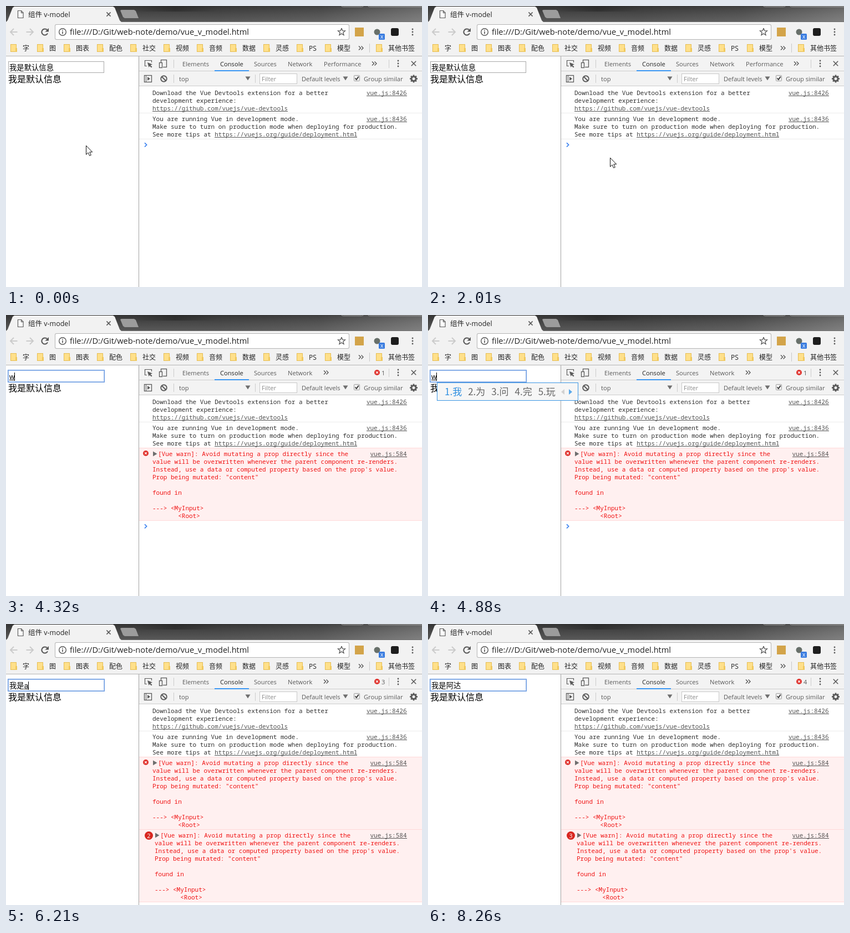
An HTML page with a canvas for the animation above (8.34 s loop, 750 by 508 pixels).

```html
<!DOCTYPE html>
<html lang="zh-CN">
<head>
<meta charset="utf-8">
<title>组件 v-model</title>
<style>
html, body { margin: 0; width: 100%; height: 100%; overflow: hidden; background: #fff; }
canvas { display: block; width: 750px; height: 508px; }
</style>
</head>
<body>
<canvas id="stage" width="750" height="508"></canvas>
<script>
const g = document.getElementById('stage').getContext('2d');
const LOOP = 8340;
const CJK = '"Noto Sans CJK SC", "Noto Sans CJK", "Noto Sans CJK JP", sans-serif';
const UI = '"Open Sans", ' + CJK;
const MONO = '11px "Noto Sans Mono", monospace';
const FIELD = '13.33px "Liberation Sans", ' + CJK;
const BIG = '16px "Liberation Sans", ' + CJK;
const IME = '300 17px ' + CJK;
const RED = '#f01414';
const MSG = '我是默认信息';

// Each entry changes part of the state from its time on.
const steps = [
  [0, { mx: 144, my: 252, pointer: 'arrow', text: MSG, compose: '', errors: 0, log: true }],
  [80, { mx: 145, my: 253 }],
  [640, { loading: true, spin: 0 }],
  [720, { spin: 1, log: false }],
  [800, { spin: 2 }],
  [870, { spin: 3 }],
  [1050, { spin: 5, log: true }],
  [1130, { spin: 6 }],
  [1340, { loading: false }],
  [1800, { mx: 212, my: 262 }],
  [1900, { mx: 290, my: 271 }],
  [2010, { mx: 328, my: 274 }],
  [2180, { mx: 255, my: 226 }],
  [2260, { mx: 172, my: 164 }],
  [2340, { mx: 133, my: 144 }],
  [2480, { mx: 139, my: 160 }],
  [2570, { mx: 142, my: 167 }],
  [2660, { mx: 140, my: 152 }],
  [2750, { mx: 136, my: 134 }],
  [2840, { pointer: 'beam', mx: 132, my: 119 }],
  [2930, { mx: 129, my: 117 }],
  [3020, { focus: true, caret: true }],
  [3400, { mx: 133, my: 115 }],
  [3570, { my: 117, caret: false, select: 4 }],
  [3690, { select: 0 }],
  [4320, { text: '', compose: 'w', select: -1, pointer: '', caret: true, errors: 1 }],
  [4420, { words: '我 为 问 完 玩', caret: false }],
  [4880, { caret: true }],
  [4980, { words: '' }],
  [5080, { text: '我', compose: '', errors: 2 }],
  [5260, { compose: 's' }],
  [5350, { compose: 'sh' }],
  [5450, { compose: 'shi', words: '是 时 事 十 使' }],
  [5550, { words: '' }],
  [5640, { text: '我是', compose: '', errors: 3 }],
  [6210, { compose: 'a' }],
  [6300, { compose: 'ad', words: '阿达 阿德 阿斗 爱的 啊' }],
  [6490, { compose: 'ada', words: '' }],
  [6570, { text: '我是阿达', compose: '', errors: 4 }],
  [7130, { caret: false }],
  [7590, { caret: true }],
  [8260, { caret: false }]
];

function stateAt(t) {
  const s = { select: -1, words: '' };
  for (const [at, change] of steps) if (at <= t) Object.assign(s, change);
  return s;
}

function box(x, y, w, h, fill) { g.fillStyle = fill; g.fillRect(x, y, w, h); }

function frame(x, y, w, h, color, width = 1) {
  g.strokeStyle = color;
  g.lineWidth = width;
  g.strokeRect(x + .5, y + .5, w - 1, h - 1);
}

function poly(points, fill) {
  g.beginPath();
  points.forEach(([x, y]) => g.lineTo(x, y));
  g.closePath();
  g.fillStyle = fill;
  g.fill();
}

function line(points, color, width = 1) {
  g.beginPath();
  points.forEach(([x, y], i) => i ? g.lineTo(x, y) : g.moveTo(x, y));
  g.strokeStyle = color;
  g.lineWidth = width;
  g.stroke();
}

function fade(x0, y0, x1, y1, colors) {
  const grad = g.createLinearGradient(x0, y0, x1, y1);
  colors.forEach((c, i) => grad.addColorStop(i / (colors.length - 1), c));
  return grad;
}

function disc(x, y, r, fill) {
  g.beginPath();
  g.arc(x, y, r, 0, 7);
  g.fillStyle = fill;
  g.fill();
}

function ring(x, y, r, color, width, a = 0, b = Math.PI * 2) {
  g.beginPath();
  g.arc(x, y, r, a, b);
  g.strokeStyle = color;
  g.lineWidth = width;
  g.stroke();
}

function pill(x, y, w, h, r, fill) {
  g.beginPath();
  g.roundRect(x, y, w, h, r);
  g.fillStyle = fill;
  g.fill();
}

function label(str, x, y, font, color, align = 'left') {
  g.font = font;
  g.textAlign = align;
  g.fillStyle = color;
  g.fillText(str, x, y);
}

function cross(x, y, r, color, width) {
  line([[x - r, y - r], [x + r, y + r]], color, width);
  line([[x - r, y + r], [x + r, y - r]], color, width);
}

function chevron(x, y, r, color, width) {
  line([[x, y - r], [x + r, y], [x, y + r]], color, width);
}

function more(x, y) { chevron(x, y, 3.5, '#555', 1.4); chevron(x + 4.5, y, 3.5, '#555', 1.4); }

function dots(x, y) { for (const d of [-5, 0, 5]) disc(x, y + d, 1.4, '#5a5a5a'); }

function errorIcon(x, y) { disc(x, y, 5, '#e0342f'); cross(x, y, 1.9, '#fff', 1.2); }

function down(x, y) { poly([[x - 4.5, y - 3.5], [x + 4.5, y - 3.5], [x, y + 3.5]], '#6e6e6e'); }

function link(str, x, y, align) {
  label(str, x, y, MONO, '#545454', align);
  const w = g.measureText(str).width;
  box(Math.round(align === 'right' ? x - w : x), y + 1, Math.round(w), 1, '#545454');
}

function titleBar(s) {
  box(0, 0, 750, 28, fade(0, 0, 0, 28, ['#343434', '#484848', '#585858']));
  box(230, 0, 150, 10, fade(230, 0, 380, 0, ['rgba(30,30,30,0)', 'rgba(30,30,30,.45)', 'rgba(30,30,30,0)']));
  box(380, 0, 370, 28, fade(380, 0, 750, 28, ['rgba(255,255,255,0)', 'rgba(255,255,255,.06)', 'rgba(255,255,255,.24)']));
  g.strokeStyle = '#a4a4a4';
  g.lineWidth = 1;
  for (const [x, w] of [[604.5, 40], [652.5, 110]]) {
    g.beginPath();
    g.roundRect(x, -6, w, 7.5, 3);
    g.stroke();
  }
  box(0, 28, 750, 1, '#6c6c6c');
  poly([[0, 29], [3, 26], [12, 3], [15, 1], [193, 1], [196, 3], [205, 26], [208, 29]], '#f2f2f2');
  poly([[206, 8], [208, 7], [231, 7], [234, 9], [239, 22], [214, 22], [211, 20]], '#9c9c9c');
  if (s.loading) {
    const a = s.spin * .9 - 4.6;
    ring(25.5, 15, 6, '#4a84e4', 2, a, a + 4.4);
  } else {
    const sheet = [[21.5, 8.5], [27.5, 8.5], [31, 12], [31, 21.5], [21.5, 21.5], [21.5, 8]];
    poly(sheet, '#fff');
    line(sheet, '#5a5a5a', 1.2);
    line([[27.5, 8.5], [27.5, 12.5], [31, 12.5]], '#5a5a5a', 1.2);
  }
  label('组件 v-model', 40, 19.5, '12.5px ' + UI, '#222');
  cross(185, 15, 3.6, '#5a5a5a', 1.5);
}

function arrowIcon(x, dir) {
  const color = '#cbcbcb';
  line([[x - 6.5 * dir, 47], [x + 5 * dir, 47]], color, 2);
  line([[x, 41], [x + 6 * dir, 47], [x, 53]], color, 2);
}

function star(x, y) {
  const pts = [];
  for (let i = 0; i <= 10; i++) {
    const r = i % 2 ? 3 : 6.8, a = i * Math.PI / 5 - Math.PI / 2;
    pts.push([x + r * Math.cos(a), y + r * Math.sin(a)]);
  }
  line(pts, '#555', 1.3);
}

function toolbar(s) {
  box(0, 29, 750, 61, '#f2f2f2');
  box(0, 90, 750, 1, '#b5b5b5');
  arrowIcon(14, -1);
  arrowIcon(43, 1);
  if (s.loading) cross(70, 47, 5.2, '#555', 2);
  else {
    ring(70, 47, 5.6, '#555', 2, .45, 5.5);
    poly([[77, 40], [77, 46.5], [70.5, 46.5]], '#555');
  }
  pill(88, 33, 531, 28, 3, '#b3b3b3');
  pill(89, 34, 529, 26, 2, '#fff');
  ring(102, 47, 6.3, '#555', 1.4);
  box(101.2, 46, 1.6, 4.5, '#555');
  box(101.2, 43.2, 1.6, 1.6, '#555');
  label('file:///D:/Git/web-note/demo/vue_v_model.html', 115, 52, '14.6px ' + UI, '#222');
  star(605, 47);
  box(629, 39, 16, 16, '#d3a44a');
  disc(669, 47, 5.5, '#68706a');
  if (!s.loading) {
    pill(672, 50, 11, 11, 1.5, '#3b7de0');
    label('x', 677.5, 59, '10px ' + UI, '#fff', 'center');
  }
  pill(694, 40, 14, 14, 3, s.loading ? '#929292' : '#1d1d1d');
  dots(733, 47);
}

function folder(x) {
  box(x, 69, 11, 14, '#e6bd53');
  box(x + 1, 70, 9, 12, '#ffe08a');
  box(x + 9, 76, 3, 7, '#f0c95f');
}

function bookmarks() {
  const font = '12px ' + UI;
  const marks = { 字: 8, 图: 56, 图表: 104, 配色: 164, 社交: 224, 视频: 284, 音频: 344, 数据: 404, 灵感: 464, PS: 524, 模型: 575 };
  for (const [name, x] of Object.entries(marks)) {
    folder(x);
    label(name, x + 22, 80.5, font, '#222');
  }
  more(636, 76);
  box(655, 68, 1, 16, '#c8c8c8');
  folder(667);
  label('其他书签', 689, 80.5, font, '#222');
}

function page(s) {
  box(0, 91, 239, 417, '#fff');
  frame(4, 100, 173, 21, '#a9a9a9');
  if (s.focus) {
    frame(3, 99, 175, 23, '#6597e0');
    frame(4, 100, 173, 21, '#a3c1ee');
  }
  label(MSG, 4, 138, BIG, '#000');
  g.font = FIELD;
  const width = str => g.measureText(str).width;
  const start = 6 + width(s.text), end = start + width(s.compose);
  label(s.text + s.compose, 6, 115.5, FIELD, '#000');
  if (s.compose) box(start, 117, end - start, 1, '#000');
  if (s.select >= 0) {
    const head = s.text.slice(0, s.select), tail = s.text.slice(s.select);
    const x = 6 + width(head);
    box(x, 104, width(tail), 16, '#3390ff');
    label(tail, x, 115.5, FIELD, '#fff');
  }
  if (s.caret) box(Math.floor(end), 104, 1, 15, '#000');
}

function devTools(s) {
  box(239, 91, 1, 417, '#a3a3a3');
  box(240, 91, 510, 54, '#f3f3f3');
  box(240, 117, 510, 1, '#ccc');
  box(240, 144, 510, 1, '#ccc');
  const font = '11.15px ' + UI, gray = '#5a5a5a';

  line([[254, 108.5], [250.5, 108.5], [250.5, 98.5], [262.5, 98.5], [262.5, 102]], gray, 1.2);
  poly([[255, 102], [264, 105.5], [260.5, 107], [263.5, 110], [262, 111.5], [259, 108.5], [257.5, 111]], gray);
  frame(279, 97, 11, 14, gray, 1.3);
  box(276, 102, 7, 10, '#f3f3f3');
  frame(276, 102, 6, 10, gray, 1.3);
  for (const y of [97, 124]) box(302, y, 1, 15, '#ccc');

  const tabs = { Elements: 318, Console: 386, Sources: 447, Network: 508 };
  if (!s.errors) tabs.Performance = 573;
  for (const [name, x] of Object.entries(tabs)) label(name, x, 108.5, font, name === 'Console' ? '#222' : gray);
  box(376, 116, 62, 2, '#3b97f3');
  more(s.errors ? 573 : 660, 104);
  if (s.errors) {
    errorIcon(669, 104);
    label(s.errors, 677, 108.5, font, gray);
  }
  box(690, 97, 1, 15, '#ccc');
  dots(707, 104);
  cross(735, 104, 4.2, gray, 1.6);

  frame(249, 125, 14, 13, gray, 1.3);
  box(252, 125, 1, 13, gray);
  poly([[255, 128], [260, 131.5], [255, 135]], gray);
  ring(284.5, 131.5, 5.3, gray, 1.9);
  line([[281, 128], [288, 135]], gray, 1.9);
  label('top', 312, 135.5, font, gray);
  down(436, 131);
  box(449, 124, 1, 15, '#ccc');
  box(457, 122, 68, 19, '#fff');
  frame(457, 122, 68, 19, '#c9c9c9');
  label('Filter', 461, 136, font, '#8a8a8a');
  label('Default levels', 533, 135.5, font, gray);
  down(612, 131);
  pill(627, 125, 11, 11, 2, '#9d9d9d');
  box(628, 126, 9, 9, '#f0f0f0');
  line([[629.5, 130.5], [631.8, 133], [635.8, 127.5]], '#333', 1.8);
  label('Group similar', 645, 135.5, font, gray);
  ring(735, 131.5, 4, gray, 3);
  for (let i = 0; i < 8; i++) {
    const a = i * Math.PI / 4, c = Math.cos(a), d = Math.sin(a);
    line([[735 + 4 * c, 131.5 + 4 * d], [735 + 7 * c, 131.5 + 7 * d]], gray, 2.6);
  }
}

function warning(y, count) {
  box(240, y, 510, 131, '#fff0f0');
  box(240, y, 510, 1, '#ffd9d9');
  box(240, y + 131, 510, 1, '#ffd9d9');
  const x = count > 1 ? 268 : 264;
  if (count > 1) {
    disc(257.5, y + 11.5, 7.5, '#d8261f');
    label(count, 257.5, y + 15.5, '11px ' + UI, '#fff', 'center');
  } else errorIcon(252, y + 10);
  poly([[x + 1, y + 6.5], [x + 8.5, y + 11], [x + 1, y + 15.5]], '#6e6e6e');
  const rows = [
    '', 'value will be overwritten whenever the parent component re-renders.',
    "Instead, use a data or computed property based on the prop's value.",
    'Prop being mutated: "content"', '', 'found in', '', '---> <MyInput>', '       <Root>'
  ];
  label('[Vue warn]: Avoid mutating a prop directly since the', x + 10, y + 15, MONO, RED);
  rows.forEach((row, i) => label(row, x, y + 15 + i * 14, MONO, RED));
  link('vue.js:584', 722.5, y + 15, 'right');
}

function consoleLog(s) {
  box(240, 145, 510, 363, '#fff');
  let y = 146;
  if (s.log) {
    const say = (str, row) => label(str, 264, row, MONO, '#303030');
    say('Download the Vue Devtools extension for a better', 161);
    say('development experience:', 175);
    link('https://github.com/vuejs/vue-devtools', 264, 189, 'left');
    link('vue.js:8426', 722.5, 161, 'right');
    box(240, 193, 510, 1, '#ececec');
    say('You are running Vue in development mode.', 208);
    say('Make sure to turn on production mode when deploying for production.', 222);
    const tips = 'See more tips at ';
    say(tips, 236);
    link('https://vuejs.org/guide/deployment.html', 264 + g.measureText(tips).width, 236, 'left');
    link('vue.js:8436', 722.5, 208, 'right');
    box(240, 240, 510, 1, '#ececec');
    y = 240;
  }
  if (s.errors > 0) { warning(y, 1); y += 131; }
  if (s.errors > 1) { warning(y, s.errors - 1); y += 131; }
  chevron(250, y + 11, 3.6, '#3b82f0', 1.7);
}

function candidates(s) {
  if (!s.words) return;
  g.font = FIELD;
  const left = Math.round(6 + g.measureText(s.text + s.compose[0]).width);
  g.font = IME;
  const items = s.words.split(' ').map((word, i) => `${i + 1}.${word}`);
  const widths = items.map(item => g.measureText(item).width);
  const total = Math.round(widths.reduce((a, b) => a + b + 11, 44));
  box(left, 122, total, 33, '#f6f6f6');
  frame(left, 122, total, 33, '#3a96e4');
  let x = left + 14;
  items.forEach((item, i) => {
    label(item, x, 145, IME, i ? '#666' : '#2f8fe0');
    x += widths[i] + 11;
  });
  const edge = left + total;
  poly([[edge - 25, 134], [edge - 25, 144], [edge - 31, 139]], '#d2d2d2');
  poly([[edge - 17, 134], [edge - 17, 144], [edge - 11, 139]], '#5aa9ea');
}

function pointer(s) {
  if (s.pointer === 'arrow') {
    const shape = [[0, 0], [0, 16], [3.6, 12.6], [6.2, 18.2], [8.8, 17], [6.3, 11.5], [11.2, 11.5], [0, 0]]
      .map(([x, y]) => [s.mx + .5 + x, s.my + .5 + y]);
    poly(shape, '#fff');
    line(shape, '#111');
  } else if (s.pointer === 'beam') {
    box(s.mx, s.my - 6, 1, 13, '#000');
    for (const y of [s.my - 7, s.my + 7]) {
      box(s.mx - 3, y, 3, 1, '#000');
      box(s.mx + 1, y, 3, 1, '#000');
    }
  }
}

function draw(now) {
  const s = stateAt(Math.max(0, now - begin) % LOOP);
  for (const part of [titleBar, toolbar, bookmarks, page, consoleLog, devTools, candidates, pointer]) part(s);
  requestAnimationFrame(draw);
}

const begin = performance.now();
draw(begin);
</script>
</body>
</html>
```
